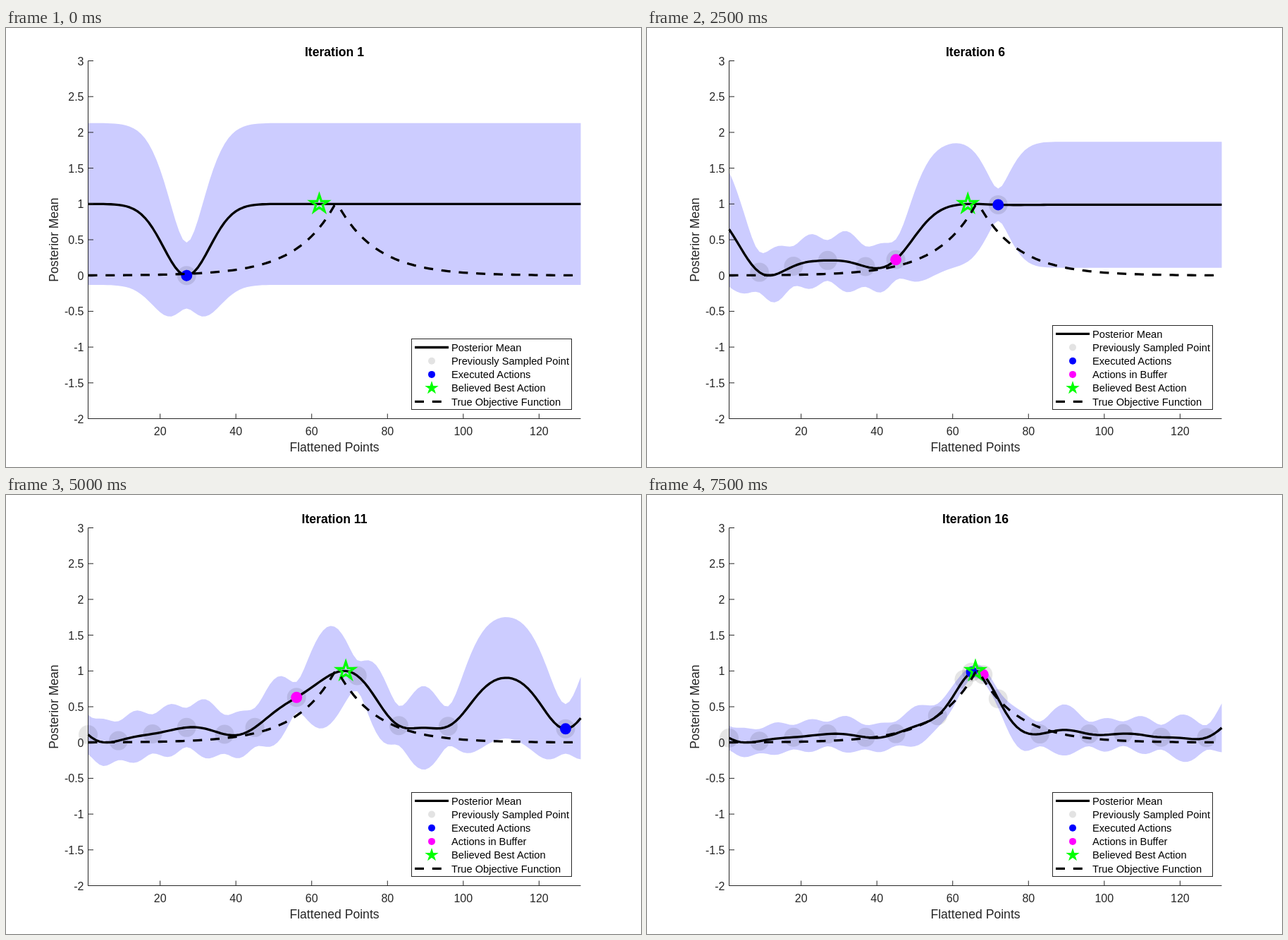
Animation, 901 px wide and 622 px high, one loop 8 s. Source, as an HTML page:

```html
<!DOCTYPE html>
<html lang="en">
<head>
<meta charset="utf-8">
<title>Posterior mean by iteration</title>
<style>
  html, body { margin: 0; width: 100%; height: 100%; overflow: hidden; background: #fff; }
  svg { display: block; width: 901px; height: 622px; }
  text { font-family: "Liberation Sans", Arial, sans-serif; fill: #262626; }
</style>
</head>
<body>
<svg id="stage" viewBox="0 0 901 622" xmlns="http://www.w3.org/2000/svg"></svg>
<script>
const NS = 'http://www.w3.org/2000/svg';
const stage = document.getElementById('stage');
const STEP = 500, COUNT = 16, LAST_X = 131;

// Sampled actions in the order they were executed.
const actions = [27, 18, 9, 37, 45, 72, 83, 1, 96, 56, 127, 105, 115, 63, 68, 65];
// Best action and prior half-width of the band for each iteration.
const best = [62, 44, 44, 54, 62, 64, 68, 68, 68, 69, 69, 68, 68, 66, 66, 66];
const spread = [1.13, 1, .93, .87, .87, .88, .86, .835, .835, .85, .85, .84, .84, .74, .53, .53];

// Utility estimates per action (execution order), and the level far from any sample.
const early = [.215, .135, .05, .195];
const keys = [
  { n: 1, far: 1, values: [0] },
  { n: 2, far: .967, values: early },
  { n: 4, far: .967, values: early },
  { n: 6, far: .99, values: [.215, .135, .05, .13, .225, .99] },
  { n: 9, far: .94, values: [.19, .12, .03, .11, .195, .925, .205, .11, .205] },
  { n: 11, far: .96, values: [.21, .12, .025, .115, .21, .935, .235, .11, .225, .63, .19] },
  { n: 13, far: .9, values: [.225, .13, .035, .13, .21, .935, .225, .1, .19, .64, .145, .24, .145] },
  { n: 15, far: .6, values: [.12, .075, .02, .075, .125, .61, .12, .065, .12, .375, .07, .125, .075, .88, .95, .985] }
];

const px = x => 116.5 + (x - 1) * 699 / 130;
const py = y => 350.7 - y * 101.4;
const lerp = (a, b, t) => a + (b - a) * t;
const kernel = (a, b) => Math.exp(-((a - b) ** 2) / 74);
const dot = (a, b) => a.reduce((sum, v, i) => sum + v * b[i], 0);
const grid = Array.from({ length: LAST_X }, (_, i) => i + 1);

function add(parent, tag, attrs, content) {
  const el = document.createElementNS(NS, tag);
  for (const name in attrs) el.setAttribute(name, attrs[name]);
  if (content !== undefined) el.textContent = content;
  parent.appendChild(el);
  return el;
}

function solve(matrix, rhs) {
  const m = matrix.map((row, i) => [...row, rhs[i]]), n = m.length;
  for (let c = 0; c < n; c++) {
    for (let r = c + 1; r < n; r++) {
      const f = m[r][c] / m[c][c];
      for (let k = c; k <= n; k++) m[r][k] -= f * m[c][k];
    }
  }
  const out = Array(n).fill(0);
  for (let r = n - 1; r >= 0; r--) {
    let sum = m[r][n];
    for (let k = r + 1; k < n; k++) sum -= m[r][k] * out[k];
    out[r] = sum / m[r][r];
  }
  return out;
}

const gram = (xs, noise) =>
  xs.map((a, i) => xs.map((b, j) => kernel(a, b) + (i === j ? noise(i) : 0)));

function estimates(n) {
  const after = keys.find(k => k.n >= n) || keys[keys.length - 1];
  const before = keys.filter(k => k.n <= n).pop();
  const t = after === before ? 0 : (n - before.n) / (after.n - before.n);
  const values = after.values.slice(0, n)
    .map((v, i) => i < before.values.length ? lerp(before.values[i], v, t) : v);
  return { values, far: lerp(before.far, after.far, t) };
}

function posterior(n) {
  const xs = actions.slice(0, n), { values, far } = estimates(n);

  const knots = [...xs, best[n - 1]];
  const weights = solve(gram(knots, () => .002), [...values, 1].map(v => v - far));
  const raw = grid.map(x => far + dot(weights, knots.map(k => kernel(x, k))));
  const low = Math.min(...raw), high = Math.max(...raw);
  const mean = raw.map(v => (v - low) / (high - low));

  const noise = i => values[i] > .5 ? .07 : i === n - 1 ? .2 : .12;
  const cov = gram(xs, noise);
  const half = grid.map(x => {
    const k = xs.map(a => kernel(x, a));
    return spread[n - 1] * Math.sqrt(Math.max(0, 1 - dot(k, solve(cov, k))));
  });
  return { xs, mean, half };
}

const points = (ys, xs = grid) =>
  xs.map((x, i) => px(x).toFixed(2) + ',' + py(ys[i]).toFixed(2));

function starPath(cx, cy, r) {
  const pts = [];
  for (let i = 0; i < 10; i++) {
    const a = i * Math.PI / 5, d = i % 2 ? r * .382 : r;
    pts.push((cx + d * Math.sin(a)).toFixed(2) + ',' + (cy - d * Math.cos(a)).toFixed(2));
  }
  return 'M' + pts.join('L') + 'Z';
}

const line = { fill: 'none', stroke: '#000', 'stroke-width': 3.3, 'stroke-linejoin': 'round' };
const dashed = { ...line, 'stroke-dasharray': '13 11.8' };
const starStyle = { fill: 'none', stroke: '#0f0', 'stroke-width': 3.2, 'stroke-miterlimit': 10 };

// Plot layers
const band = add(stage, 'path', { fill: '#ccccff' });
const meanLine = add(stage, 'path', line);
const sampled = add(stage, 'g', { fill: '#000', 'fill-opacity': .1 });
const executed = add(stage, 'circle', { r: 8, fill: '#00f' });
const buffered = add(stage, 'circle', { r: 8, fill: '#f0f' });
const star = add(stage, 'path', starStyle);
const objective = grid.map(x => Math.exp(-Math.max(66 - x, x - 67, 0) / 10.4) * .98);
add(stage, 'path', { ...dashed, d: 'M' + points(objective).join('L') });

// Axes
let axes = 'M116.5 46.5V553.5H815.5';
const label = (x, y, size, anchor, str, extra) =>
  add(stage, 'text', { x, y, 'font-size': size, 'text-anchor': anchor, ...extra }, str);
for (let x = 20; x <= 120; x += 20) {
  axes += `M${px(x)} 553.5v-7`;
  label(px(x), 576.5, 16, 'middle', x);
}
for (let y = -2; y <= 3; y += .5) {
  axes += `M116.5 ${py(y)}h7.5`;
  label(110.5, py(y) + 6, 16, 'end', y);
}
add(stage, 'path', { d: axes, fill: 'none', stroke: '#262626', 'stroke-width': 1 });
label(466, 600, 17.6, 'middle', 'Flattened Points');
label(0, 0, 17.6, 'middle', 'Posterior Mean', { transform: 'translate(73.5 300) rotate(-90)' });
const title = label(466, 39.5, 17.6, 'middle', '', { 'font-weight': 'bold', style: 'fill:#000' });

// Legend
const dot5 = fill => (g, y) => add(g, 'circle', { cx: 604, cy: y, r: 5, fill });
const stroke = style => (g, y) => add(g, 'path', { ...style, d: `M580 ${y}H628` });
const entries = [
  ['Posterior Mean', stroke(line)],
  ['Previously Sampled Point', dot5('#e3e3e3')],
  ['Executed Actions', dot5('#00f')],
  ['Actions in Buffer', dot5('#f0f')],
  ['Believed Best Action', (g, y) => add(g, 'path', { ...starStyle, fill: '#0f0', d: starPath(604, y, 5) })],
  ['True Objective Function', stroke(dashed)]
];

function legend(rows) {
  const g = add(stage, 'g', {});
  const height = rows.length * 19.4 + 2.6;
  add(g, 'rect', { x: 575.5, y: Math.round(540 - height) + .5, width: 227, height: Math.round(height),
    fill: '#fff', stroke: '#262626' });
  rows.forEach(([str, mark], i) => {
    const y = 529.3 - (rows.length - 1 - i) * 19.2;
    mark(g, y);
    add(g, 'text', { x: 632, y: y + 5.2, 'font-size': 14.67, style: 'fill:#000' }, str);
  });
  return g;
}
const shortLegend = legend(entries.filter((_, i) => i !== 3));
const fullLegend = legend(entries);

const show = (el, on) => el.setAttribute('visibility', on ? 'visible' : 'hidden');

function place(circle, x, mean) {
  circle.setAttribute('cx', px(x));
  circle.setAttribute('cy', py(mean[x - 1]));
}

function draw(n) {
  const { xs, mean, half } = posterior(n);
  const upper = points(mean.map((m, i) => m + half[i]));
  const lower = points(mean.map((m, i) => m - half[i])).reverse();
  band.setAttribute('d', 'M' + [...upper, ...lower].join('L') + 'Z');
  meanLine.setAttribute('d', 'M' + points(mean).join('L'));

  sampled.replaceChildren();
  xs.forEach(x => place(add(sampled, 'circle', { r: 13.5 }), x, mean));
  place(executed, xs[n - 1], mean);
  if (n > 1) place(buffered, xs[n - 2], mean);
  show(buffered, n > 1);

  const b = best[n - 1];
  star.setAttribute('d', starPath(px(b), py(mean[b - 1]), 13));
  title.textContent = 'Iteration ' + n;
  show(shortLegend, n === 1);
  show(fullLegend, n > 1);
}

let shown = 0;
const start = performance.now();
function tick(now) {
  const n = Math.floor(Math.max(0, now - start) / STEP) % COUNT + 1;
  if (n !== shown) draw(shown = n);
  requestAnimationFrame(tick);
}
tick(start);
</script>
</body>
</html>
```
